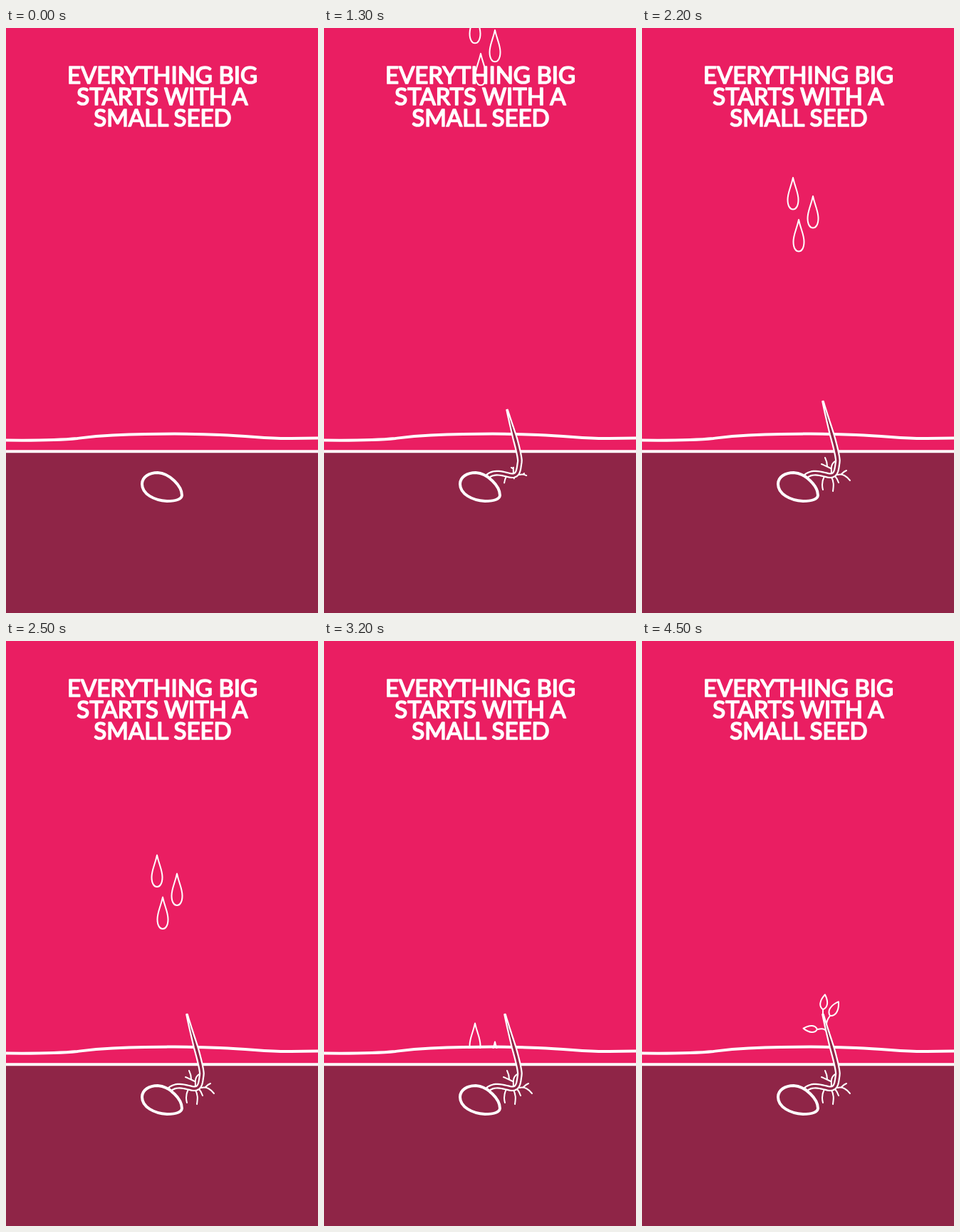
Write an HTML page that moves like this. It is 438x821 px and loops after 4.6 s.

```html
<!DOCTYPE html>
<html lang="en">
<head>
<meta charset="utf-8">
<title>Small seed</title>
<style>
  html, body { margin: 0; width: 100%; height: 100%; overflow: hidden; background: #ea1e62; }
  svg { display: block; width: 438px; height: 821px; }
  text {
    font: 33px Lato, sans-serif; text-anchor: middle;
    fill: #fff; stroke: #fff; stroke-width: 1.7; stroke-linejoin: round;
  }
  .line { fill: none; stroke: #fff; stroke-width: 2; stroke-linecap: round; stroke-linejoin: round; }
  .bold { stroke-width: 4; }
  .soil { fill: #8f2547; }
  .leaf { fill: #ea1e62; }
</style>
</head>
<body>
<svg viewBox="0 0 438 821">
  <defs>
    <clipPath id="sky"><path d="M0 0H438V572H0Z"/></clipPath>
    <path id="drop" d="M0 0C3 14 7.5 21 7.5 31C7.5 40 4 44.5 0 44.5S-7.5 40-7.5 31C-7.5 21-3 14 0 0Z"/>
    <path id="spine" d="M230 629C240 621 252 626 262 628C274 630 273 618 275 608C274 592 263 560 254 524"/>
  </defs>
  <rect width="438" height="821" fill="#ea1e62"/>
  <text x="219.5" y="78">EVERYTHING BIG</text>
  <text x="219.5" y="108">STARTS WITH A</text>
  <text x="220" y="138">SMALL SEED</text>
  <g clip-path="url(#sky)">
    <g id="rain" class="line">
      <use href="#drop" x="212"/>
      <use href="#drop" x="240" y="26"/>
      <use href="#drop" x="220" y="59"/>
    </g>
  </g>
  <rect class="soil" y="594" width="438" height="227"/>
  <path class="line bold" d="M-4 578.5C40 579 80 578 100 576C115 574 125 572.5 150 571.5C210 569 260 569 300 571C350 573 365 576.5 400 576L442 575.5M-4 594.2H442"/>
  <g id="roots" class="line">
    <path d="M266 627C266 620 264 613 271 608"/>
    <path d="M265 618C261 616 257 614 252 612"/>
    <path d="M260 615C260 610 259 607 257 603"/>
    <path d="M256 629C253 635 252 641 254 648"/>
    <path d="M265 629C270 636 269 643 268 650"/>
    <path d="M271 629C274 632 275 635 276 638"/>
    <path d="M274 627C282 625 287 629 292 635"/>
    <path d="M280 626C282 624 284 622 287 621"/>
  </g>
  <g id="twigs" class="line">
    <path d="M259 539C259 534 260 531 264 526"/>
    <path d="M254 525V517"/>
    <path d="M260 550C257 543 252 544 246 545"/>
  </g>
  <path id="stem" class="line soil" style="stroke-width:2.2"/>
  <path class="line bold soil" d="M191 640C191 630 201 624 213 624C230 625 247 643 247 656C246 662 236 664 226 664C208 663 191 654 191 640Z"/>
  <g id="leaves" class="line"></g>
</svg>
<script>
const $ = id => document.getElementById(id);
const ramp = (t, a, b) => Math.min(1, Math.max(0, (t - a) / (b - a)));
const spine = $("spine"), spineLength = spine.getTotalLength();

// base x, base y, angle, size, start of growth
const leaves = [[254, 517, 8, 1, 3900], [264, 526, 31, 1.1, 3800], [246, 545, -86, .93, 4000]]
  .map(([x, y, angle, size, start]) => {
    const el = document.createElementNS("http://www.w3.org/2000/svg", "path");
    el.setAttribute("class", "line leaf");
    el.setAttribute("d", "M0 0C-6-3-7-11 0-21C7-11 6-3 0 0Z");
    $("leaves").append(el);
    return { el, x, y, angle, size, start };
  });

for (const el of document.querySelectorAll("#roots path, #twigs path")) {
  el.setAttribute("pathLength", 1);
  el.setAttribute("stroke-dasharray", "1 2");
}

function reveal(el, p) {
  el.style.visibility = p > 0 ? "visible" : "hidden";
  el.setAttribute("stroke-dashoffset", 1 - p);
}

// Outline around the grown part of the spine, narrowing towards its tip
function stemOutline(p) {
  if (!p) return "";
  const end = spineLength * p, taper = 3 + 45 * ramp(p, .4, 1);
  const left = [], right = [];
  for (let i = 0; i <= 50; i++) {
    const s = end * i / 50;
    const a = spine.getPointAtLength(Math.max(0, s - .5));
    const b = spine.getPointAtLength(s + .5);
    const c = spine.getPointAtLength(s);
    const len = Math.hypot(b.x - a.x, b.y - a.y) || 1;
    const half = .7 + 2.1 * Math.min(1, (end - s) / taper);
    const nx = (a.y - b.y) / len * half, ny = (b.x - a.x) / len * half;
    left.push(`${c.x + nx} ${c.y + ny}`);
    right.unshift(`${c.x - nx} ${c.y - ny}`);
  }
  return `M${left.concat(right).join("L")}Z`;
}

function draw(t) {
  $("stem").setAttribute("d", stemOutline(ramp(t, 200, 1400)));
  [...$("roots").children].forEach((el, i) => reveal(el, ramp(t, 1150 + i % 3 * 100, 1450 + i % 3 * 100)));
  [...$("twigs").children].forEach((el, i) => reveal(el, ramp(t, 3500 + i * 150, 3850 + i * 100)));

  const s = t - 2200;
  $("rain").setAttribute("transform", `translate(0 ${210 + .291 * s + .0000355 * s * s})`);

  for (const { el, x, y, angle, size, start } of leaves) {
    const grow = size * ramp(t, start, start + 400);
    el.style.visibility = grow ? "visible" : "hidden";
    el.style.strokeWidth = 2 / (grow || 1);
    el.setAttribute("transform", `translate(${x} ${y}) rotate(${angle}) scale(${grow})`);
  }
}

const begin = performance.now();
function tick() {
  const t = (performance.now() - begin) % 4600;
  draw(Math.floor(t / 100) * 100);
  requestAnimationFrame(tick);
}
tick();
</script>
</body>
</html>
```
